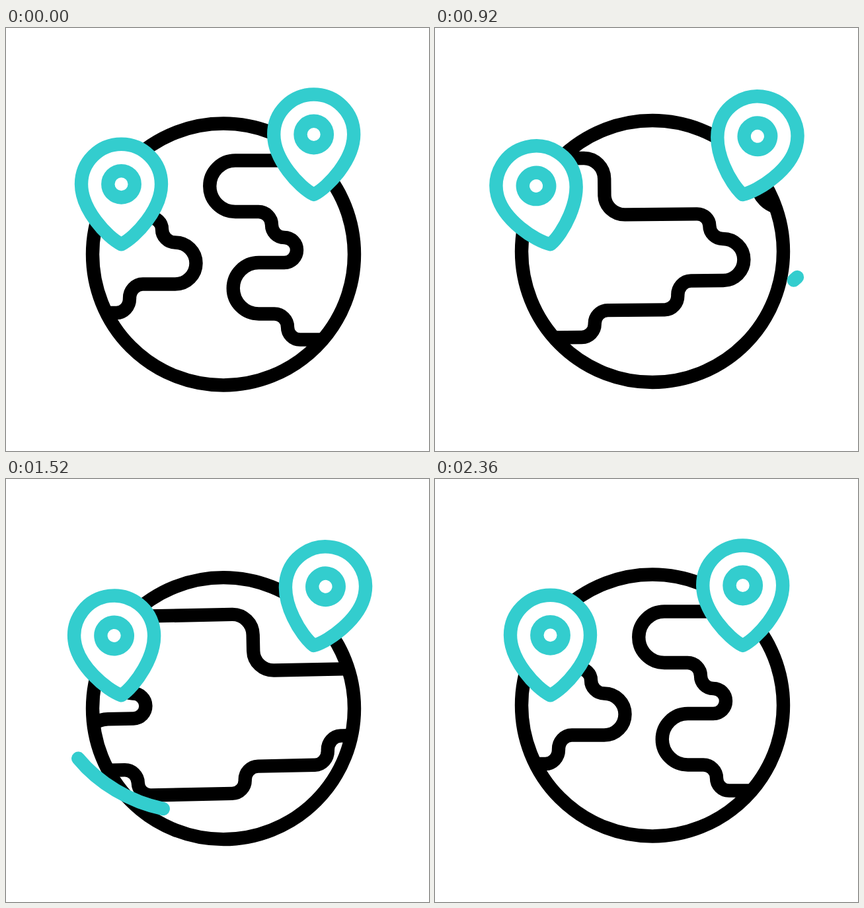
Animation of 640x640 px, one loop 3 s. Source, as an HTML page:

```html
<!DOCTYPE html>
<html lang="en">
<head>
<meta charset="utf-8">
<title>Turning globe with two map pins</title>
<style>
  html, body { margin: 0; height: 100%; overflow: hidden; background: #fff; }
  svg { display: block; width: 100vw; height: 100vh; fill: none; stroke: #000; stroke-width: 20.4; stroke-linejoin: round; }
  .teal { stroke: #33cdce; }
  .streak { stroke-linecap: round; }
</style>
</head>
<body>
<svg viewBox="0 0 640 640">
  <defs>
    <clipPath id="disc"><circle cx="329" cy="342.5" r="200"/></clipPath>
    <path id="land" d="M347 200.5a38.7 38.7 0 0 0 0 77.5H382a20 20 0 0 1 20 20a19 19 0 0 0 19 19
      a19 19 0 0 1 0 38H382.5a38.7 38.7 0 0 0 0 77.5H406a20 20 0 0 1 20 20a19 19 0 0 0 19 19
      H568a20 20 0 0 0 20 -20a20 20 0 0 1 20 -20.5H694a20 21.5 0 0 0 20 -21.5a20 21.5 0 0 1 20 -22
      H783a31.5 31.5 0 0 0 0 -63a20 20 0 0 1 -20 -20a19 18 0 0 0 -19 -18
      H635.5a31 30 0 0 1 -31 -30V232a31 31.5 0 0 0 -31 -31.5Z"/>
    <g id="pin">
      <path fill="#fff" d="M0 91C-22 80 -60.5 38 -60.5 0A60.5 60.5 0 0 1 60.5 0C60.5 38 22 80 0 91Z"/>
      <circle r="20.2"/>
    </g>
  </defs>
  <g id="globe">
    <g clip-path="url(#disc)">
      <g id="lands">
        <use href="#land" x="-527"/>
        <use href="#land"/>
        <use href="#land" x="527"/>
      </g>
    </g>
    <circle cx="329" cy="342.5" r="198"/>
  </g>
  <path class="teal streak" data-start="914" pathLength="1" d="M548 377C490 430 405 462 330 465C280 467 178 459 107 393"/>
  <path class="teal streak" data-start="1113" pathLength="1" d="M548 409C500 475 390 505 275 503C210 502 145 468 107 420"/>
  <use id="left" class="teal" href="#pin"/>
  <use id="right" class="teal" href="#pin"/>
</svg>
<script>
const LOOP = 3000, STEP = 40, START = 200, REST = 2360;
const PERIOD = 527, TURNS = 4;
const el = id => document.getElementById(id);
const move = (id, transform) => el(id).setAttribute('transform', transform);
const streaks = document.querySelectorAll('.streak');
const clamp = v => Math.min(1, Math.max(0, v));

// Eases from pose to pose, one per beat, and stays at the last
function swing(t, start, beat, ...poses) {
  const n = Math.max(0, (t - start) / beat), i = Math.floor(n);
  const from = poses[i] ?? 0, to = poses[i + 1] ?? 0;
  return from + (to - from) * (1 - Math.cos((n - i) * Math.PI)) / 2;
}

// Quick start, long soft stop
const spin = t => TURNS * PERIOD * (1 - (1 - (Math.max(0, t - START) / 2900) ** 2) ** 8.42);

// Pins lean around their tips
function lean(id, x, y, dx) {
  const angle = Math.asin(dx / 90) * 180 / Math.PI;
  move(id, `translate(${x} ${y}) rotate(${angle} 0 90)`);
}

function draw(t) {
  if (t >= REST) t = 0;
  const bob = 4.7 * swing(t, 240, 620, 0, -1, 1, 0);
  const tilt = 2.8 * swing(t, START, 500, 0, -1, 1, -1, 0);
  move('globe', `translate(0 ${bob})`);
  move('lands', `rotate(${tilt} 329 342.5) translate(${-(spin(t) % PERIOD)} 0)`);
  lean('left', 174.5, 236.3, swing(t, 240, 390, 0, -18.6, -22, -10.6, -12.2, 0));
  lean('right', 465.7, 161, swing(t, 240, 390, 0, 18, 23, 21.8, 0));
  for (const s of streaks) {
    const age = t - s.dataset.start;
    const head = clamp(age / 410), tail = clamp((age - 178) / 335);
    s.style.display = head > tail ? '' : 'none';
    s.style.strokeDasharray = `${head - tail} 3`;
    s.style.strokeDashoffset = -tail;
  }
}

function frame() {
  const t = performance.now() % LOOP;
  draw(Math.floor(t / STEP) * STEP);
  requestAnimationFrame(frame);
}
frame();
</script>
</body>
</html>
```
